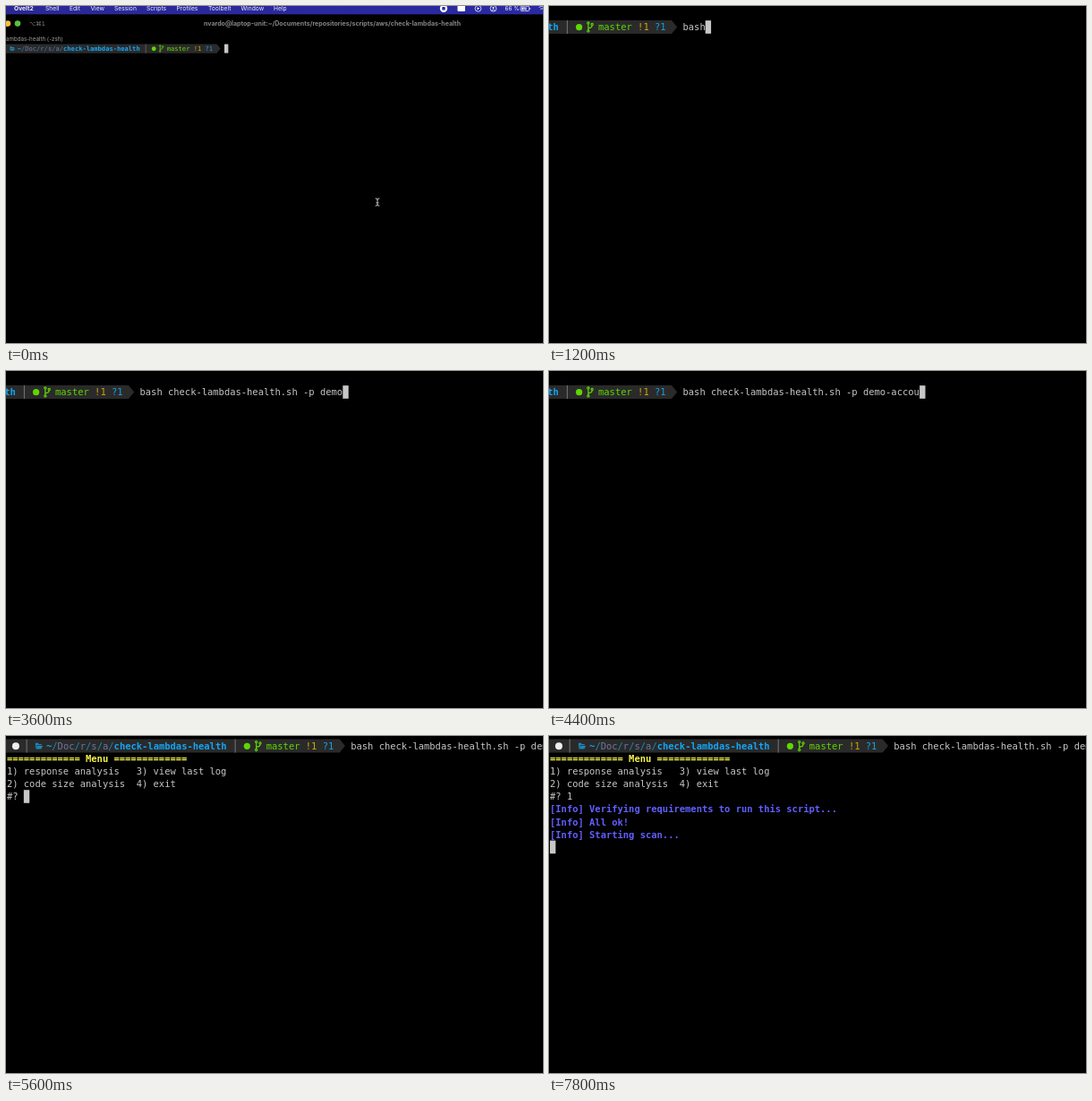
These frames come from a looping animation (600x376 px, 8000 ms). An HTML page:

```html
<!DOCTYPE html>
<html lang="en">
<head>
<meta charset="utf-8">
<title>Lambda health check in a terminal</title>
<style>
  html, body { margin: 0; width: 100%; height: 100%; overflow: hidden; background: #000; }
  svg { display: block; width: 100vw; height: 100vh; }
  text { white-space: pre; }
  .term { font: 10.46px "DejaVu Sans Mono", monospace; fill: #c7c7c7; }
  .bar { font: 6.7px Inter, "Open Sans", sans-serif; fill: #f2f2fa; }
  .dim { fill: #858585; }
  .bold { font-weight: 700; }
</style>
</head>
<body>
<svg id="stage" viewBox="0 0 600 376" preserveAspectRatio="none">
  <defs>
    <linearGradient id="sky">
      <stop offset="0" stop-color="#2c2796"/>
      <stop offset="1" stop-color="#2a2aa6"/>
    </linearGradient>
    <path id="beam" d="M-2.7-6q2.7 0 2.7 2.4q0-2.4 2.7-2.4M0-4V4M-2.7 6q2.7 0 2.7-2.4q0 2.4 2.7 2.4M-1.4 1H1.4"/>
  </defs>
  <rect width="600" height="376" fill="#000"/>
  <g id="camera">
    <g id="chrome" class="bar">
      <rect x="-40" y="-60" width="800" height="69.3" fill="url(#sky)"/>
      <circle cx="1.9" cy="19.6" r="3.3" fill="#f6be3f"/>
      <circle cx="13" cy="19.6" r="3.3" fill="#57c043"/>
      <text class="dim" x="26" y="22" style="font-family:'DejaVu Sans',sans-serif;font-size:6.4px">⌥⌘1</text>
      <text class="dim bold" x="364.5" y="22" text-anchor="middle" style="font-size:7.05px">nvardo@laptop-unit:~/Documents/repositories/scripts/aws/check-lambdas-health</text>
      <text x="0" y="38.6" style="font-size:6.2px;fill:#a0a0a0">ambdas-health (-zsh)</text>
      <circle cx="489" cy="2.8" r="4.2" fill="#fff"/>
      <rect x="487.3" y="1.1" width="3.4" height="3.4" rx=".6" fill="#2a28a0"/>
      <rect x="504.5" y="-2" width="8.5" height="8" rx="1" fill="#fff"/>
      <g fill="none" stroke="#f2f2fa" stroke-width=".8">
        <circle cx="527.5" cy="2.8" r="3.4"/>
        <circle cx="544.5" cy="2.8" r="3.4"/>
        <path d="M542.5 5.2q2-2.4 4 0"/>
        <rect x="575" y=".2" width="9.5" height="5.4" rx="1.4"/>
        <path d="M595.5 1.5q3.5-3 7 0M597 3.6q2-1.8 4 0"/>
      </g>
      <path d="M526.5 1.2l2.8 1.6l-2.8 1.6z" fill="#f2f2fa"/>
      <circle cx="544.5" cy="2.1" r="1.1" fill="#f2f2fa"/>
      <rect x="576.2" y="1.4" width="5.5" height="3" fill="#f2f2fa"/>
      <path d="M580.6-.6l-2.6 4h1.6l-.6 3l2.8-4h-1.7z" fill="#f2f2fa" stroke="#2a28a0" stroke-width=".5"/>
      <path d="M585.2 2v2l1.2-1z" fill="#f2f2fa"/>
      <text x="557.5" y="5.2" style="font-size:6.4px">66 %</text>
    </g>
    <g id="prompt" class="term">
      <path d="M0 3.6H372.8L379 11.1L372.8 18.6H0z" fill="#2a2a2a"/>
      <circle cx="11" cy="11.2" r="4" fill="#eeeeee"/>
      <path d="M23.2 3.6V18.6M256.2 3.6V18.6" stroke="#777" stroke-width="1"/>
      <path d="M33 7.8h2.8l1 1.1h3v1.4h-5l-1.8 4zM35 10.9h6.2l-1.8 3.5h-6z" fill="#1b86b8"/>
      <circle cx="269.4" cy="11.3" r="3.6" fill="#5fd700"/>
      <g fill="none" stroke="#5fd700" stroke-width="1.2">
        <path d="M279.7 7.8V14.5M284 9.2q0 2.4-2.4 2.7t-1.9 1.4"/>
        <circle cx="279.7" cy="6.6" r="1.1"/>
        <circle cx="284" cy="8" r="1.1"/>
        <circle cx="279.7" cy="15.5" r="1.1"/>
      </g>
    </g>
    <g id="screen" class="term"></g>
    <rect id="caret" width="6.4" height="14.6" fill="#c7c7c7"/>
    <g id="pointer" fill="none" stroke-linecap="round">
      <use href="#beam" stroke="#444" stroke-width="2.2"/>
      <use href="#beam" stroke="#c8c8c8" stroke-width="1"/>
    </g>
  </g>
</svg>
<script>
const LOOP = 8000, STEP = 200;
const CELL = 6.3, LINE = 14.1, LEFT = 1, COMMAND_COL = 61;
const COMMAND = 'bash check-lambdas-health.sh -p demo-account';
const WIDE = { s: 0.68, x: -18, y: 40 };
const CLOSE = { s: 1, x: -235.8, y: 12.4 };
const HOME = { s: 1, x: 0, y: 0 };
const MOVE_MS = 860, PAN_AT = 4800;

// [time, characters typed so far]
const TYPING = [[0, 0], [800, 1], [1000, 2], [1200, 4], [1400, 6], [1600, 8], [1800, 29],
  [2600, 30], [2800, 31], [3000, 32], [3400, 34], [3600, 36], [3800, 37],
  [4000, 39], [4200, 40], [4400, 42], [4600, 44]];
const MENU_AT = 5400, CHOICE_AT = 6000, RUN_AT = 6600, SCAN_AT = 7200;

const $ = id => document.getElementById(id);
const colX = col => LEFT + col * CELL;
const rowY = row => 11.2 + row * LINE;

function addText(parent, x, y, str, fill, bold) {
  const el = document.createElementNS('http://www.w3.org/2000/svg', 'text');
  el.setAttribute('x', x);
  el.setAttribute('y', y);
  el.textContent = str;
  if (fill) el.style.fill = fill;
  if (bold) el.classList.add('bold');
  parent.appendChild(el);
  return el;
}
const print = (parent, col, row, str, fill, bold) =>
  addText(parent, colX(col), rowY(row) + 3.7, str, fill, bold);

[['Ovelt2', 9], ['Shell', 44], ['Edit', 71], ['View', 94.5], ['Session', 121], ['Scripts', 157],
  ['Profiles', 190.5], ['Toolbelt', 226], ['Window', 262.5], ['Help', 299]]
  .forEach(([label, x], i) => addText($('chrome'), x, 5.3, label, null, i === 0));

const prompt = $('prompt');
print(prompt, 7, 0, '~', '#1a9fe6', true);
print(prompt, 8, 0, '/   / / / ', '#1a88c0');
print(prompt, 9, 0, 'Doc r s a', '#7076a0');
print(prompt, 18, 0, '/', '#1a88c0');
print(prompt, 19, 0, 'check-lambdas-health', '#14a5f4', true);
print(prompt, 46, 0, 'master', '#5fd700');
print(prompt, 53, 0, '!1', '#d7a500');
print(prompt, 56, 0, '?1', '#1a9fe6');

const screen = $('screen'), YELLOW = '#f8f84e', INFO = '#625fff';
const command = print(screen, COMMAND_COL, 0, '');
const rule = '='.repeat(13);
const output = [
  [MENU_AT, 1, `${rule} Menu ${rule}`, YELLOW, true],
  [MENU_AT, 2, '1) response analysis   3) view last log'],
  [MENU_AT, 3, '2) code size analysis  4) exit'],
  [MENU_AT, 4, '#? '],
  [CHOICE_AT, 4, '   1'],
  [RUN_AT, 5, '[Info] Verifying requirements to run this script...', INFO, true],
  [SCAN_AT, 6, '[Info] All ok!', INFO, true],
  [SCAN_AT, 7, '[Info] Starting scan...', INFO, true]
].map(([at, row, ...rest]) => ({ at, el: print(screen, 0, row, ...rest) }));

$('chrome').setAttribute('transform',
  `scale(${1 / WIDE.s}) translate(${-WIDE.x} ${-WIDE.y})`);
$('pointer').setAttribute('transform', 'translate(636.8 263)');

const easeOut = (t, start) => 1 - (1 - Math.min(1, Math.max(0, (t - start) / MOVE_MS))) ** 3;
const mix = (a, b, k) => a + (b - a) * k;

function cameraAt(t) {
  const [from, to, k] = t < PAN_AT
    ? [WIDE, CLOSE, easeOut(t, 0)]
    : [CLOSE, HOME, easeOut(t, PAN_AT)];
  return ['x', 'y', 's'].map(key => mix(from[key], to[key], k));
}

function caretAt(t, typed) {
  if (t >= SCAN_AT) return [0, 8];
  if (t >= RUN_AT) return [0, 6];
  if (t >= CHOICE_AT) return [4, 4];
  if (t >= MENU_AT) return [3, 4];
  return [COMMAND_COL + typed, 0];
}

function render(time) {
  const t = Math.floor((time % LOOP) / STEP) * STEP;
  const [x, y, s] = cameraAt(t);
  $('camera').setAttribute('transform', `translate(${x} ${y}) scale(${s})`);

  const typed = TYPING.filter(([at]) => at <= t).pop()[1];
  command.textContent = COMMAND.slice(0, typed);
  for (const { at, el } of output) el.style.display = t >= at ? '' : 'none';

  const [col, row] = caretAt(t, typed);
  $('caret').setAttribute('x', colX(col));
  $('caret').setAttribute('y', rowY(row) - 7.4);
  $('pointer').style.display = typed ? 'none' : '';
}

const start = performance.now();
function tick() {
  render(performance.now() - start);
  requestAnimationFrame(tick);
}
tick();
</script>
</body>
</html>
```
